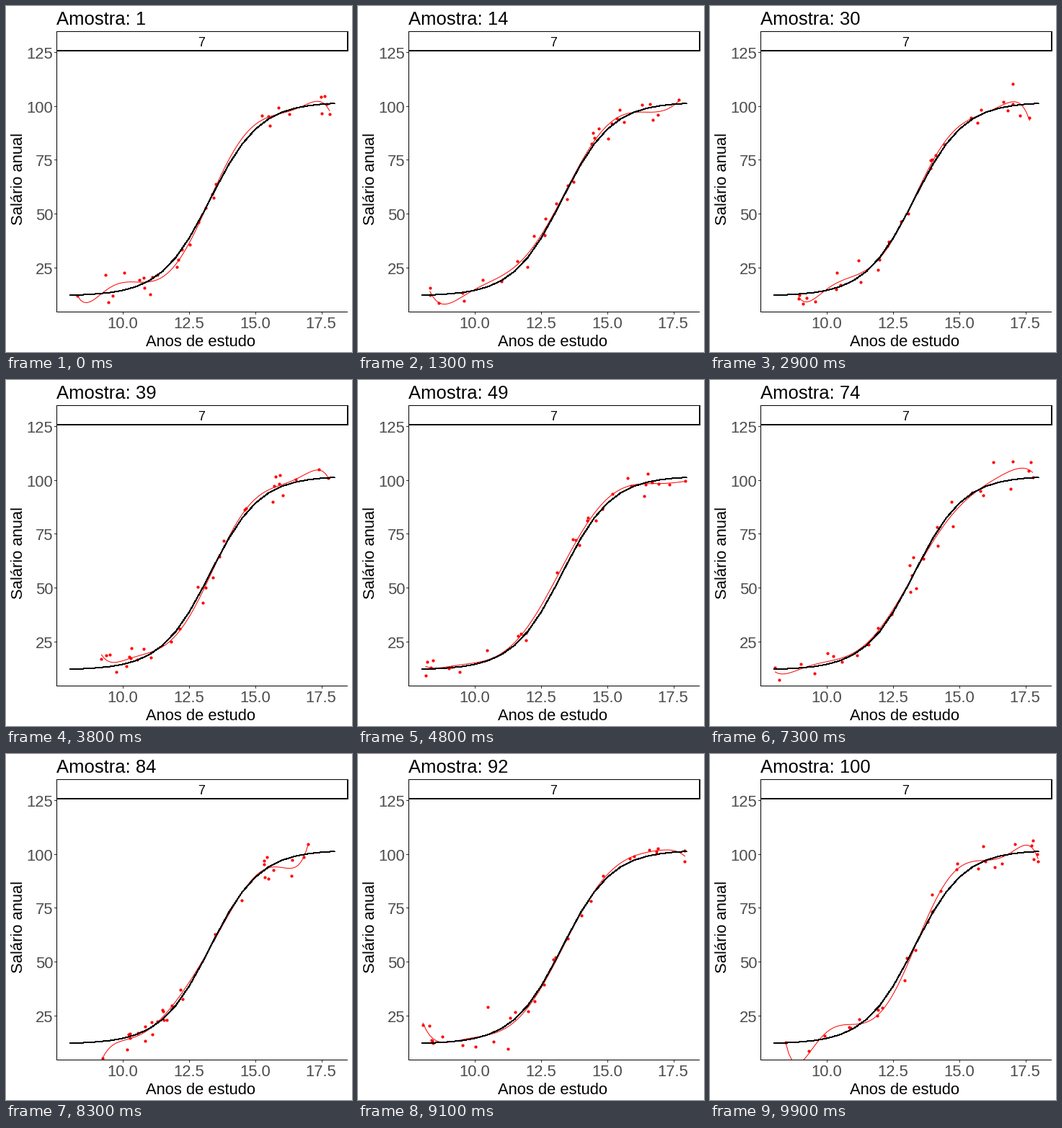
Write a matplotlib script that moves like this. It is 480 px wide and 480 px high and loops after 10000 ms.

```python
import matplotlib.pyplot as plt
import numpy as np
from matplotlib.animation import FuncAnimation
from matplotlib.patches import Rectangle
from numpy.polynomial import Polynomial

SIZE, DPI = 480, 96
PT = 72 / DPI  # points per pixel
SAMPLES, POINTS, DEGREE, NOISE = 100, 30, 7, 4
GREY, TICK, RED = "#4D4D4D", "#333333", "#FF0000"


def px(x):
    return 89 + 36.7 * (x - 8)


def py(y):
    return 437.9 - 2.986 * y


def salary(x):
    return 12 + 90 / (1 + np.exp(-1.07 * (x - 13.3)))


def sample(n):
    """Noisy points of sample n and their polynomial fit."""
    rng = np.random.default_rng(n)
    x = np.sort(rng.uniform(8, 18, POINTS))
    y = salary(x) + rng.normal(0, NOISE, POINTS)
    return x, y, Polynomial.fit(x, y, DEGREE)


fig = plt.figure(figsize=(SIZE / DPI, SIZE / DPI), dpi=DPI, facecolor="white")
ax = fig.add_axes([0, 0, 1, 1])
ax.set(xlim=(0, SIZE), ylim=(SIZE, 0))
ax.axis("off")


def bar(x0, y0, x1, y1, color="black"):
    ax.add_patch(Rectangle((x0, y0), x1 - x0, y1 - y0, color=color,
                           lw=0, antialiased=False, zorder=5))


def label(x, y, text, size, color="black", ha="center", rotation=0):
    return ax.text(x, y, text, fontsize=size * PT, family="Liberation Sans",
                   color=color, ha=ha, va="baseline", rotation=rotation,
                   rotation_mode="anchor")


# strip
bar(70, 35, 474, 36)
bar(70, 35, 71, 62)
bar(70, 61, 474, 63)
bar(473, 35, 475, 63)
label(271, 56.5, "7", 18)

# axes
bar(70, 62, 71, 425)
bar(70, 424, 474, 425)
for v in np.arange(10, 18, 2.5):
    c = round(px(v))
    bar(c, 425, c + 1, 428, TICK)
    label(px(v) - 0.6, 447, f"{v:.1f}", 22, GREY)
for v in range(25, 126, 25):
    c = int(py(v))
    bar(67, c, 70, c + 1, TICK)
    label(65.6, py(v) + 8.4, str(v), 22, GREY, ha="right")
label(270.5, 471.5, "Anos de estudo", 22)
label(23, 240, "Salário anual", 22, rotation=90)
title = label(70, 26, "", 25.6, ha="left")

# data
panel = Rectangle((70, 62), 404, 362, transform=ax.transData)
dots, = ax.plot([], [], "o", color=RED, ms=4.2 * PT, mew=0, zorder=2)
curve, = ax.plot([], [], color=RED, lw=PT, zorder=3)
grid = np.arange(8, 18.1, 0.5)
truth, = ax.plot(px(grid), py(salary(grid)), color="black", lw=PT,
                 antialiased=False, solid_capstyle="butt", zorder=4)
for line in (dots, curve, truth):
    line.set_clip_path(panel)


def update(i):
    x, y, fit = sample(i + 1)
    title.set_text(f"Amostra: {i + 1}")
    dots.set_data(px(x), py(y))
    xs = np.linspace(x[0], x[-1], 80)
    curve.set_data(px(xs), py(fit(xs)))
    return title, dots, curve


anim = FuncAnimation(fig, update, frames=SAMPLES, interval=100,
                     repeat=True, repeat_delay=0)
plt.show()
```
